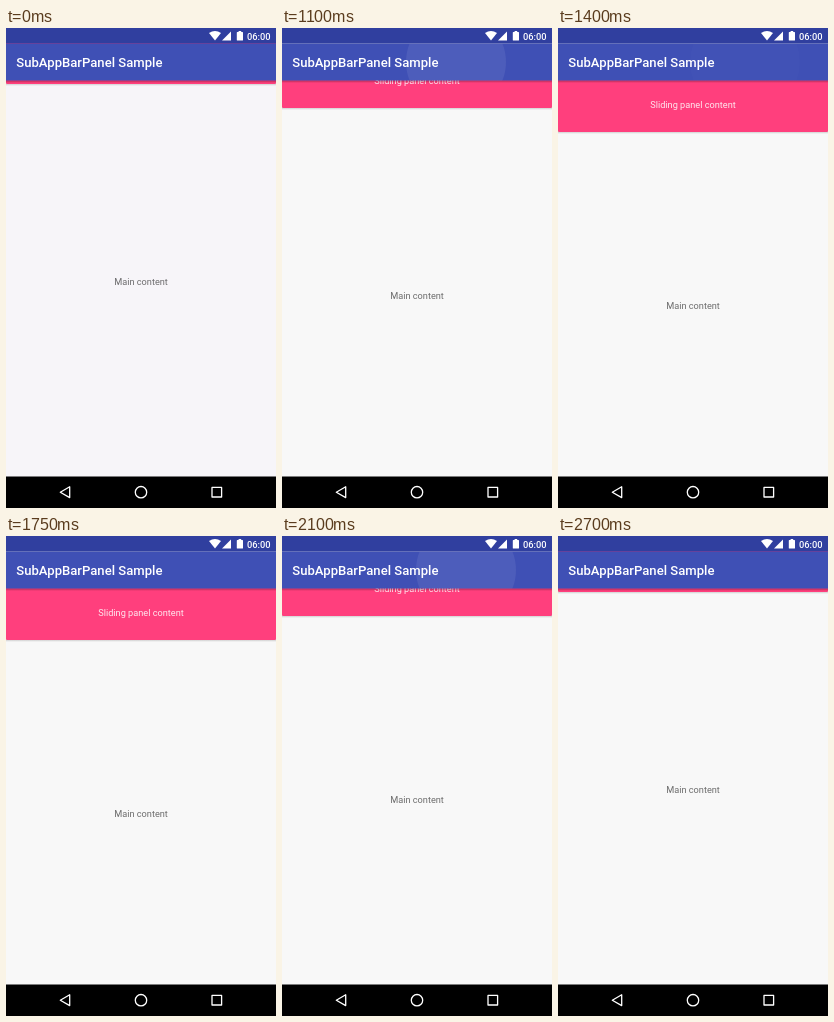
These frames come from a looping animation (270x480 px, 2800 ms). An HTML page with a canvas:

```html
<!DOCTYPE html>
<html lang="en">
<head>
<meta charset="utf-8">
<title>Sliding panel</title>
<style>
  html, body { margin: 0; width: 100%; height: 100%; overflow: hidden; background: #000; }
  canvas { display: block; width: 270px; height: 480px; }
</style>
</head>
<body>
<canvas id="stage"></canvas>
<script>
const W = 270, H = 480, LOOP = 2800, STEP = 50;
const BAR_TOP = 15.5, BAR_BOTTOM = 52.5, NAV_TOP = 448.5;
const OPEN_AT = 950, CLOSE_AT = 1950, SLIDE = 300, TRAVEL = 48;
const FONT = 'Roboto, sans-serif';

const canvas = document.getElementById('stage');
const ctx = canvas.getContext('2d');
const dpr = window.devicePixelRatio || 1;
canvas.width = W * dpr;
canvas.height = H * dpr;
ctx.scale(dpr, dpr);

const clamp = v => Math.max(0, Math.min(1, v));
const ease = v => (1 - Math.cos(Math.PI * clamp(v))) / 2;
const openness = t => ease((t - OPEN_AT) / SLIDE) - ease((t - CLOSE_AT) / SLIDE);

// Piecewise linear value through [time, value] points
function along(points, t) {
  let [t0, v0] = points[0];
  for (const [t1, v1] of points) {
    if (t < t1) return v0 + (v1 - v0) * clamp((t - t0) / (t1 - t0));
    [t0, v0] = [t1, v1];
  }
  return v0;
}

function rect(x, y, w, h, color) {
  ctx.fillStyle = color;
  ctx.fillRect(x, y, w, h);
}

function poly(points) {
  ctx.beginPath();
  points.forEach(([x, y]) => ctx.lineTo(x, y));
  ctx.closePath();
}

function label(text, x, y, size, color, align = 'center', weight = 400) {
  ctx.font = `${weight} ${size}px ${FONT}`;
  ctx.textAlign = align;
  ctx.fillStyle = color;
  ctx.fillText(text, x, y);
}

function shadow(y, h, alpha) {
  const g = ctx.createLinearGradient(0, y, 0, y + h);
  g.addColorStop(0, `rgba(0,0,0,${alpha})`);
  g.addColorStop(1, 'rgba(0,0,0,0)');
  rect(0, y, W, h, g);
}

function panel(open) {
  const bottom = 56 + TRAVEL * open;
  shadow(bottom - 1, 3, 0.24);
  ctx.fillStyle = '#ff3f7d';
  ctx.beginPath();
  ctx.roundRect(0, bottom - 60, W, 60, 1.5);
  ctx.fill();
  label('Sliding panel content', 135, bottom - 23.7, 9.2, 'rgba(255,255,255,0.88)');
}

function ripple(age, xs) {
  if (age < 0 || age >= 500) return;
  const r = along([[0, 8], [50, 25], [100, 40], [150, 50], [250, 51], [500, 56]], age);
  const alpha = along([[0, 0.13], [150, 0.075], [250, 0.05], [500, 0]], age);
  ctx.save();
  ctx.beginPath();
  ctx.rect(0, BAR_TOP, W, BAR_BOTTOM - BAR_TOP);
  ctx.clip();
  ctx.fillStyle = `rgba(255,255,255,${alpha})`;
  ctx.beginPath();
  ctx.arc(along(xs, age), along([[0, 31], [150, 34]], age), r, 0, 2 * Math.PI);
  ctx.fill();
  ctx.restore();
}

function statusBar() {
  rect(0, 0, W, BAR_TOP, '#303f9f');
  ctx.fillStyle = '#fff';
  // Wi-Fi
  ctx.beginPath();
  ctx.moveTo(237, 12.5);
  ctx.lineTo(231, 5);
  ctx.quadraticCurveTo(237, 1, 243, 5);
  ctx.closePath();
  ctx.save();
  ctx.translate(0, 0);
  ctx.restore();
  ctx.beginPath();
  ctx.moveTo(209, 12.5);
  ctx.lineTo(203, 5);
  ctx.quadraticCurveTo(209, 1, 215, 5);
  ctx.closePath();
  ctx.fill();
  // Signal
  poly([[216, 12.5], [225, 12.5], [225, 3.5]]);
  ctx.fill();
  // Battery
  ctx.beginPath();
  ctx.roundRect(230.8, 4, 6.2, 8.6, 0.6);
  ctx.rect(232.6, 3, 2.6, 1.2);
  ctx.fill();
  label('06:00', 241, 11.5, 9.3, '#fff', 'left', 500);
}

function navBar() {
  rect(0, NAV_TOP, W, H - NAV_TOP, '#000');
  ctx.strokeStyle = '#fff';
  ctx.lineWidth = 1.3;
  ctx.lineJoin = 'round';
  poly([[54.3, 464.2], [63.7, 458.8], [63.7, 469.6]]);
  ctx.stroke();
  ctx.beginPath();
  ctx.arc(135, 464.2, 5.7, 0, 2 * Math.PI);
  ctx.stroke();
  ctx.strokeRect(206, 459.4, 9.6, 9.6);
}

function draw(t) {
  rect(0, 0, W, H, t < 1000 ? '#f7f5f9' : '#f8f8f8');
  label('Main content', 135, 257.2 + 24 * openness(t + 14), 9.2, 'rgba(0,0,0,0.56)');
  panel(openness(t));
  shadow(BAR_BOTTOM, 2.5, 0.3);
  rect(0, BAR_TOP, W, BAR_BOTTOM - BAR_TOP, '#3f50b5');
  ripple(t - OPEN_AT, [[0, 185], [150, 174], [250, 187]]);
  ripple(t - CLOSE_AT, [[0, 190], [150, 184]]);
  label('SubAppBarPanel Sample', 10.3, 38.8, 13.1, '#fff', 'left', 500);
  statusBar();
  navBar();
}

function tick() {
  const t = performance.now() % LOOP;
  draw(Math.floor(t / STEP) * STEP);
  requestAnimationFrame(tick);
}
tick();
</script>
</body>
</html>
```
